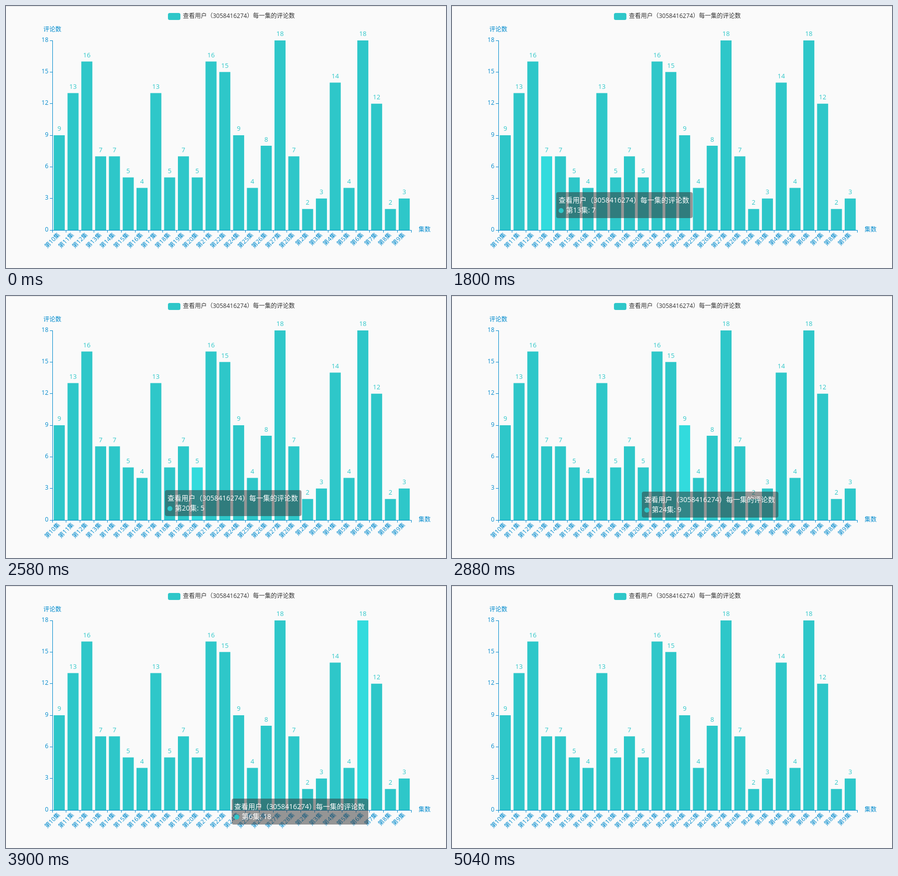
Recreate the animation shown at these times as an HTML page with a canvas. Size 883 by 525 pixels, loop 6.42 s.

```html
<!DOCTYPE html>
<html lang="zh">
<head>
<meta charset="utf-8">
<style>
html, body { margin: 0; width: 100%; height: 100%; overflow: hidden; background: #fafafa; }
canvas { display: block; }
</style>
</head>
<body>
<canvas id="stage" width="883" height="525"></canvas>
<script>
const ctx = document.getElementById('stage').getContext('2d');
const LOOP = 6420, TICK = 60, SHOW = 1380, HIDE = 5040;
const LEFT = 93, RIGHT = 813, BASE = 449, TOP = 69, MAX = 18;
const TEAL = '#2ec7c9', LIT = '#32dbdd', BLUE = '#008acd';
const FONT = '"Open Sans", "Noto Sans CJK SC", "Noto Sans CJK JP", sans-serif';
const TITLE = '查看用户（3058416274）每一集的评论数';

// Episodes 10 to 28 come before 2 to 9; 23 has no comments
const range = (from, to) => Array.from({ length: to - from + 1 }, (_, i) => from + i);
const episodes = [...range(10, 22), ...range(24, 28), ...range(2, 9)];
const counts = [9, 13, 16, 7, 7, 5, 4, 13, 5, 7, 5, 16, 15, 9, 4, 8, 18, 7, 2, 3, 14, 4, 18, 12, 2, 3];
const slot = (RIGHT - LEFT) / counts.length;
const yOf = value => BASE - value * (BASE - TOP) / MAX;

// The tooltip trails the pointer, then flips to its left near the edge
const path = [
  { t: SHOW, pointer: 102, x: 461, y: 306 },
  { t: 1560, pointer: 139, x: 185, y: 366 },
  { t: 2280, pointer: 287, x: 257, y: 386 },
  { t: 2880, pointer: 462, x: 381, y: 392 },
  { t: 3360, pointer: 577, x: 501, y: 404 },
  { t: 3420, pointer: 591, x: 564, y: 407 },
  { t: 3540, pointer: 622, x: 606, y: 410 },
  { t: 3900, pointer: 716, x: 453, y: 426 },
  { t: 4620, pointer: 795, x: 501, y: 443 }
];

function poseAt(t) {
  const i = path.findIndex(p => p.t > t);
  if (i < 0) return path[path.length - 1];
  const a = path[i - 1], b = path[i], k = (t - a.t) / (b.t - a.t);
  const mix = key => a[key] + (b[key] - a[key]) * k;
  return { pointer: mix('pointer'), x: Math.round(mix('x')), y: Math.round(mix('y')) };
}

function text(str, x, y, color, align = 'left', size = 12) {
  ctx.font = `${size}px ${FONT}`;
  ctx.fillStyle = color;
  ctx.textAlign = align;
  ctx.textBaseline = 'middle';
  ctx.fillText(str, x, y);
}

function rect(x, y, w, h, color, radius = 0) {
  ctx.fillStyle = color;
  ctx.beginPath();
  ctx.roundRect(x, y, w, h, radius);
  ctx.fill();
}

function drawAxes() {
  rect(LEFT, TOP, 1, BASE - TOP + 1, BLUE);
  rect(LEFT, BASE, RIGHT - LEFT + 1, 1, BLUE);
  for (let v = 0; v <= MAX; v += 3) {
    const y = Math.floor(yOf(v));
    rect(LEFT - 5, y, 5, 1, BLUE);
    text(v, 85, y, BLUE, 'right');
  }
  for (let i = 0; i <= counts.length; i++) rect(Math.floor(LEFT + i * slot), BASE, 1, 5, BLUE);
  episodes.forEach((n, i) => {
    ctx.save();
    ctx.translate(LEFT + (i + 0.5) * slot, BASE + 8);
    ctx.rotate(-Math.PI / 4);
    text(`第${n}集`, 0, 0, BLUE, 'right');
    ctx.restore();
  });
  text('评论数', LEFT, 48, BLUE, 'center');
  text('集数', 828, 449, BLUE);
}

function drawBars(active) {
  counts.forEach((n, i) => {
    const x = LEFT + (i + 0.1) * slot, y = yOf(n);
    rect(x, y, slot * 0.8, BASE - y, i === active ? LIT : TEAL);
    text(n, x + slot * 0.4, y - 12, TEAL, 'center', 13);
  });
}

function drawTooltip({ x, y }, index) {
  rect(x, y, 274, 52, 'rgba(50, 50, 50, 0.5)', 4);
  text(TITLE, x + 5, y + 17, '#fff', 'left', 14);
  rect(x + 5, y + 32, 10, 10, TEAL, 5);
  text(`第${episodes[index]}集: ${counts[index]}`, x + 20, y + 37, '#fff', 'left', 14);
}

function draw(now) {
  const t = Math.floor(now % LOOP / TICK) * TICK;
  const pose = t >= SHOW && t < HIDE ? poseAt(t) : null;
  const place = pose ? (pose.pointer - LEFT) / slot - 0.1 : -1;
  const last = Math.floor(place);
  const overBar = place - last < 0.8;

  rect(0, 0, 883, 525, '#fafafa');
  rect(0, 0, 883, 1, '#ddd');
  rect(325, 14, 25, 14, TEAL, 3.5);
  text(TITLE, 355, 21, '#333');
  drawAxes();
  drawBars(overBar ? last : -1);
  if (pose) drawTooltip(pose, last);
}

const begin = performance.now();
function frame() {
  draw(performance.now() - begin);
  requestAnimationFrame(frame);
}
frame();
</script>
</body>
</html>
```
